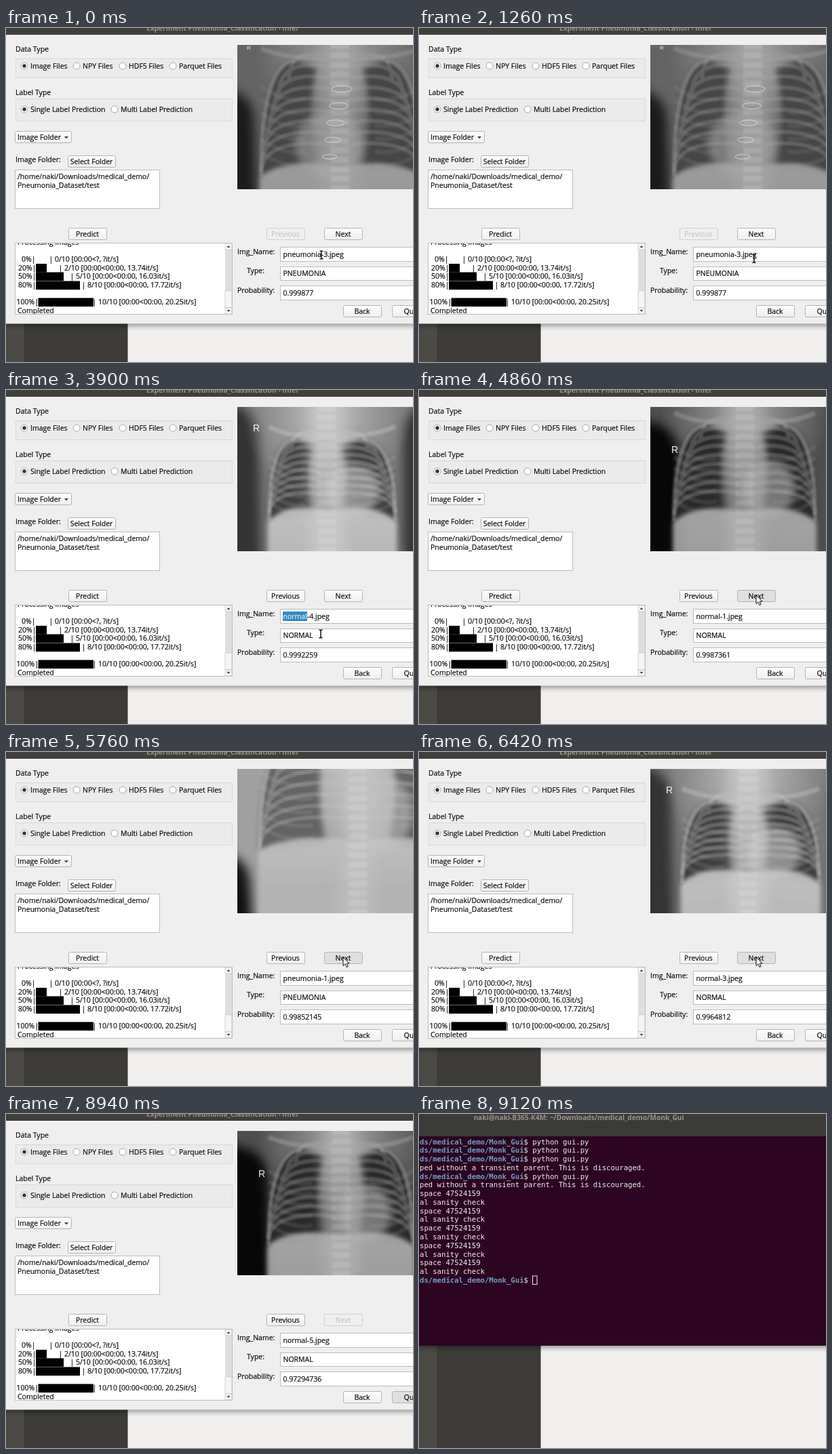
An HTML page with a canvas that plays this animation: 600 px wide and 493 px high, repeating every 9180 ms.

```html
<!DOCTYPE html>
<html lang="en">
<head>
<meta charset="utf-8">
<title>Classification demo</title>
<style>
html, body { margin: 0; width: 100%; height: 100%; overflow: hidden; background: #f0efee; }
svg, canvas, #dialog { position: absolute; left: 0; top: 0; }
#scan { left: 341px; top: 25px; }
text { font: 10.5px "Open Sans", "Noto Sans", sans-serif; fill: #0c0c0c; stroke: #0c0c0c; stroke-width: .2px; white-space: pre; }
.title { font-weight: bold; font-size: 10.2px; fill: #97938a; stroke: none; text-anchor: middle; }
.mono { font: 10.63px "DejaVu Sans Mono", monospace; fill: #eeeeec; stroke: none; }
.prompt { font-weight: bold; fill: #6f9fc0; }
.group { fill: #ebebeb; stroke: #d8d8d8; }
.field { fill: #fff; stroke: #bcbcbc; }
.button rect { fill: url(#face); stroke: #b4b4b4; }
.button text { text-anchor: middle; }
.button.hover rect { fill: #dfdfdf; }
.button.off rect { fill: #efefef; stroke: #cfcfcf; }
.button.off text { fill: #bdbdbd; stroke: none; }
#nameCopy { fill: #fff; stroke: none; }
.shadow { filter: drop-shadow(0 2px 4px #0007); }
</style>
</head>
<body>
<svg width="600" height="493">
  <rect width="600" height="493" fill="#f0efee"/>
  <rect width="179.5" height="493" fill="#3c3b37"/>
  <rect width="26.5" height="493" fill="#4b4a45"/>
  <rect class="shadow" x="-10" width="620" height="342" fill="#2d0422"/>
  <rect width="600" height="33" fill="#3c3b37"/>
  <text class="title" x="235.5" y="8.5">naki@naki-B365-K4M: ~/Downloads/medical_demo/Monk_Gui</text>
  <g id="terminal"></g>
  <rect x="167.5" y="239" width="6.5" height="12.5" fill="none" stroke="#eeeeec"/>
</svg>
<div id="dialog">
  <svg width="600" height="493">
    <defs>
      <linearGradient id="face" x2="0" y2="1"><stop stop-color="#fdfdfd"/><stop offset="1" stop-color="#efefef"/></linearGradient>
      <clipPath id="picked"><rect id="range" y="327" height="14"/></clipPath>
      <clipPath id="logView"><rect x="14" y="318" width="309" height="104"/></clipPath>
    </defs>
    <rect class="shadow" x="-10" width="620" height="436.5" fill="#efefef"/>
    <rect width="600" height="10" fill="#403f3b"/>
    <text class="title" x="319.5" y="3.5">Experiment Pneumonia_Classification - Infer</text>
    <rect class="group" x="14.5" y="45.5" width="319" height="28"/>
    <rect class="group" x="14.5" y="104.5" width="319" height="33"/>
    <text x="14" y="35">Data Type</text>
    <text x="14" y="99">Label Type</text>
    <text x="14" y="198">Image Folder:</text>
    <rect class="field" x="13.5" y="209.5" width="213" height="57"/>
    <text x="17" y="223">/home/naki/Downloads/medical_demo/</text>
    <text x="17" y="235.5">Pneumonia_Dataset/test</text>
    <rect class="field" x="13.5" y="317.5" width="320" height="105"/>
    <g id="log" clip-path="url(#logView)"></g>
    <rect x="323" y="318" width="10" height="104" fill="#dedede"/>
    <path d="M323 318h10v9h-10zM323 388h10v25h-10zM323 413h10v9h-10z" fill="#f5f5f5" stroke="#c4c4c4" stroke-width=".7"/>
    <path d="M325.5 324l2.5-3 2.5 3zM325.5 416l2.5 3 2.5-3z" fill="#444"/>
    <text x="341" y="333.5">Img_Name:</text>
    <text x="355" y="362">Type:</text>
    <text x="341" y="390.5">Probability:</text>
    <rect class="field" x="404.5" y="323.5" width="220" height="21"/>
    <rect class="field" x="404.5" y="352.5" width="220" height="20"/>
    <rect class="field" x="404.5" y="380.5" width="220" height="21"/>
    <text id="name" x="408.5" y="338"></text>
    <text id="type" x="408.5" y="366"></text>
    <text id="odds" x="408.5" y="394.5"></text>
    <g clip-path="url(#picked)">
      <rect x="405" y="327" width="60" height="14" fill="#308cc6"/>
      <text id="nameCopy" x="408.5" y="338"></text>
    </g>
    <g id="controls"></g>
    <path d="M86 160h6l-3 3.5z" fill="#444"/>
    <path id="arrow" d="M0 0v12.5l3-2.7 2 4.7 2.2-1-2-4.5h4z" fill="#fff" stroke="#111"/>
    <path id="beam" d="M-2.5-6q2.5 0 2.5 1.5q0-1.5 2.5-1.5M0-5v10M-2.5 6q2.5 0 2.5-1.5q0 1.5 2.5 1.5" fill="none" stroke="#111" stroke-width="1.5"/>
  </svg>
  <canvas id="scan" width="259" height="213"></canvas>
</div>
<script>
const LOOP = 9180, STEP = 60;
const $ = id => document.getElementById(id);
const label = (x, y, text, attrs = '') =>
  `<text x="${x}" y="${y}" ${attrs}>${text.replace(/</g, '&lt;')}</text>`;

// Window controls
const button = (id, x, y, w, h, text) => `<g class="button" id="${id}">
  <rect x="${x + .5}" y="${y + .5}" width="${w}" height="${h}" rx="2"/>${label(x + w / 2, y + 13, text)}</g>`;
const radio = (x, y, text, on) => `<circle cx="${x}" cy="${y}" r="5" fill="#fff" stroke="#a8a8a8"/>` +
  (on ? `<circle cx="${x}" cy="${y}" r="2.7" fill="#333"/>` : '') + label(x + 9, y + 4, text);

$('controls').innerHTML =
  radio(27, 56, 'Image Files', true) + radio(104, 56, 'NPY Files') +
  radio(172, 56, 'HDF5 Files') + radio(246, 56, 'Parquet Files') +
  radio(27, 120, 'Single Label Prediction', true) + radio(160, 120, 'Multi Label Prediction') +
  button('source', 13, 152, 83, 17, '') + label(17, 165, 'Image Folder') +
  button('select', 91, 188, 70, 17, 'Select Folder') + button('predict', 92, 295, 56, 17, 'Predict') +
  button('previous', 384, 295, 56, 17, 'Previous') + button('next', 469, 295, 56, 17, 'Next') +
  button('back', 497, 409, 56, 17, 'Back') + button('quit', 569, 409, 56, 17, 'Quit');

const logRow = (y, percent, x, bar, restX, rest) =>
  `<rect x="${x}" y="${y - 9.5}" width="${bar}" height="12.7"/>` +
  label(x + .5, y, percent + '%|', 'text-anchor="end"') + label(restX - 2.5, y, '| ' + rest);
$('log').innerHTML = label(17, 320, 'Processing Images') +
  logRow(345, 0, 43, 0, 66, '0/10 [00:00<?, ?it/s]') +
  logRow(357.5, 20, 44, 16, 80, '2/10 [00:00<00:00, 13.74it/s]') +
  logRow(370, 50, 44, 41, 97, '5/10 [00:00<00:00, 16.03it/s]') +
  logRow(383, 80, 44, 65, 114, '8/10 [00:00<00:00, 17.72it/s]') +
  logRow(408, 100, 47.5, 81.5, 130, '10/10 [00:00<00:00, 20.25it/s]') +
  label(17, 420.5, 'Completed');

// Terminal
const prompt = command => `<tspan class="prompt">ds/medical_demo/Monk_Gui</tspan>$ ${command}`;
const run = prompt('python gui.py');
const warning = 'ped without a transient parent. This is discouraged.';
const lines = [run, run, run, warning, run, warning];
for (let i = 0; i < 5; i++) lines.push('space 47524159', 'al sanity check');
lines.push(prompt(''));
$('terminal').innerHTML = lines.map((line, i) =>
  `<text class="mono" x="1" y="${44.5 + i * 12.77}">${line}</text>`).join('');

// Chest scans: positions on the stage, tones as grey levels
const wide = { spine: 492, edge: 366, arm: 90, left: 376, right: 612, top: 48, base: 203, gap: 34,
  heart: [-16, 172, 50, 48], bg: 28, body: 100, lung: 70, bright: 168, mark: [355, 32, 8], wires: [495, 90, 477, 190] };
const narrow = { spine: 463, edge: 350, arm: 150, left: 358, right: 575, top: 45, base: 165, gap: 28,
  heart: [0, 140, 45, 45], bg: 30, body: 105, lung: 78, bright: 180, mark: [353, 32, 8],
  wires: [463, 70, 453, 168], width: 245, bubble: true };
const clear = { spine: 473, edge: 372, arm: 20, left: 388, right: 574, rim: 586, top: 72, base: 177, gap: 20,
  heart: [38, 148, 40, 38], bg: 52, body: 120, lung: 62, bright: 205, mark: [364, 61, 14] };
const close = { spine: 518, edge: 360, arm: 150, left: 374, right: 660, top: -30, base: 130, gap: 46,
  heart: [30, 90, 50, 60], bg: 18, body: 160, lung: 100, bright: 196 };
const pale = { spine: 503, edge: 368, arm: 110, left: 382, right: 622, top: 52, base: 180, gap: 30,
  heart: [22, 155, 45, 42], bg: 18, body: 145, lung: 90, bright: 195, mark: [359, 34, 8] };
const sharp = { spine: 494, edge: 386, arm: 45, left: 387, right: 600, top: 52, base: 178, gap: 26,
  heart: [36, 146, 38, 42], bg: 8, body: 78, lung: 42, bright: 180, mark: [372, 93, 14] };

// Start time, file, probability, scan
const results = [
  [0, 'pneumonia-3', '0.999877', wide],
  [1680, 'pneumonia-4', '0.9999919', narrow],
  [2340, 'normal-4', '0.9992259', clear],
  [4800, 'normal-1', '0.9987361', { ...sharp, spine: 480, left: 376, right: 584 }],
  [5220, 'pneumonia-5', '0.99961376', { ...pale, spine: 490, right: 600, top: 60 }],
  [5760, 'pneumonia-1', '0.99852145', close],
  [6300, 'normal-3', '0.9964812', { ...clear, spine: 485, right: 590, rim: 610 }],
  [6780, 'normal-2', '0.9978934', { ...sharp, top: 66, base: 186 }],
  [7200, 'pneumonia-2', '0.99973446', pale],
  [7680, 'normal-5', '0.97294736', sharp],
];

const ctx = $('scan').getContext('2d');
const grey = (v, alpha = 1) => `rgba(${v},${v},${v},${alpha})`;
function pen(blur, color, width = 1) {
  ctx.filter = blur ? `blur(${blur}px)` : 'none';
  ctx.fillStyle = ctx.strokeStyle = color;
  ctx.lineWidth = width;
  ctx.beginPath();
}
function oval(x, y, rx, ry) {
  ctx.moveTo(x + rx, y);
  ctx.ellipse(x, y, rx, ry, 0, 0, 7);
}

function drawBody(s) {
  const rim = s.rim || 650;
  pen(8, grey(s.body));
  ctx.moveTo(310, s.arm);
  ctx.quadraticCurveTo(s.edge, s.arm, s.edge, s.arm + 50);
  ctx.lineTo(s.edge + 4, 260);
  ctx.lineTo(rim, 260);
  ctx.lineTo(rim, s.arm + 50);
  ctx.quadraticCurveTo(rim, s.arm, 640, s.arm);
  ctx.lineTo(640, 0);
  ctx.lineTo(310, 0);
  ctx.fill();

  const glow = ctx.createRadialGradient(s.spine, 35, 10, s.spine, 35, 125);
  glow.addColorStop(0, grey(s.bright, .8));
  glow.addColorStop(1, grey(s.bright, 0));
  pen(0, glow);
  ctx.fillRect(341, 25, 259, 213);
}

function drawSide(s, dir) {
  const inner = s.spine + dir * s.gap, outer = dir < 0 ? s.left : s.right;
  const span = outer - inner, height = s.base - s.top;
  const apex = inner + span * .4;
  const chestWall = () => {
    ctx.moveTo(apex, s.top);
    ctx.bezierCurveTo(inner + span * .85, s.top + 4, outer, s.top + height * .5, outer, s.base + 16);
  };

  pen(4, grey(s.lung));
  chestWall();
  ctx.lineTo(inner, s.base + 6);
  ctx.quadraticCurveTo(inner + span * .2, s.top + height * .5, inner, s.top + 12);
  ctx.fill();

  pen(1, grey(s.bright, .28), 6);
  for (let k = 0; k < 9; k++) {
    const u = k / 8, y = s.top - 6 + u * height * .85;
    const tip = inner + span * (.5 + .5 * Math.sqrt(u));
    ctx.moveTo(s.spine + dir * 8, y);
    ctx.bezierCurveTo(inner + span * .3, y - 10, tip, y, tip, y + height * .25);
  }
  ctx.stroke();

  pen(1.5, grey(s.bright, .14), 6);
  for (let k = 2; k < 8; k++) {
    const y = s.top + k * height / 8;
    ctx.moveTo(outer, y);
    ctx.quadraticCurveTo(inner + span * .6, y + 24, inner + span * .2, y + 18);
  }
  ctx.stroke();

  pen(1.5, grey(s.bright, .4), 6);
  chestWall();
  ctx.stroke();

  pen(1.5, grey(s.bright, .35), 7);
  ctx.moveTo(s.spine + dir * 12, s.top + 2);
  ctx.bezierCurveTo(inner, s.top - 8, apex, s.top + 2, outer, s.top - 18);
  ctx.stroke();
}

function drawAbdomen({ left, spine, right, base, bright }) {
  const fade = ctx.createLinearGradient(0, base, 0, base + 70);
  fade.addColorStop(0, grey(bright, .85));
  fade.addColorStop(1, grey(bright - 15, .9));
  pen(3, fade);
  ctx.moveTo(left - 2, 260);
  ctx.lineTo(left - 2, base + 18);
  ctx.bezierCurveTo(left + 20, base - 4, spine - 45, base - 8, spine, base + 2);
  ctx.bezierCurveTo(spine + 45, base - 8, right - 20, base - 4, right + 2, base + 18);
  ctx.lineTo(right + 2, 260);
  ctx.fill();
}

function drawScan(s) {
  ctx.setTransform(1, 0, 0, 1, -341, -25);
  ctx.clearRect(341, 25, 259, 213);
  ctx.save();
  ctx.beginPath();
  ctx.rect(341, 25, s.width || 259, 213);
  ctx.clip();
  pen(0, grey(s.bg));
  ctx.fillRect(341, 25, 259, 213);

  drawBody(s);
  drawSide(s, -1);
  drawSide(s, 1);
  drawAbdomen(s);

  const [dx, y, rx, ry] = s.heart;
  pen(6, grey(s.bright, .55));
  oval(s.spine + dx, y, rx, ry);
  ctx.fill();
  pen(10, grey(s.bright, .6));
  ctx.fillRect(s.spine - 26, 0, 52, 260);
  pen(1.5, grey(255, .13));
  for (let v = 22; v < 240; v += 14) ctx.fillRect(s.spine - 14, v, 28, 9);

  if (s.bubble) {
    pen(7, grey(70, .8));
    oval(540, 220, 26, 13);
    ctx.fill();
  }
  if (s.wires) {
    const [x0, y0, x1, y1] = s.wires;
    pen(0, grey(225, .8));
    for (let k = 0; k < 5; k++)
      oval(x0 + (x1 - x0) * k / 4, y0 + (y1 - y0) * k / 4, s.bubble ? 8 : 15 - k, 5 - k * .4);
    ctx.stroke();
  }
  if (s.mark) {
    const [x, y, size] = s.mark;
    pen(0, grey(240));
    ctx.font = `${size}px "Liberation Sans", sans-serif`;
    ctx.fillText('R', x, y);
  }
  ctx.restore();
}

// Pointer path: time, x, y
const path = [[0, 465, 335], [400, 470, 362], [720, 488, 378], [1020, 480, 374], [1500, 508, 307],
  [2460, 508, 307], [2880, 478, 335], [3060, 443, 333], [3360, 389, 331], [3720, 464, 360],
  [3900, 464, 360], [4140, 410, 365], [4260, 392, 360], [4620, 497, 303], [8340, 497, 303],
  [8640, 606, 405], [8880, 606, 405], [8940, 604, 416], [LOOP, 604, 416]];
function pointerAt(t) {
  const i = path.findIndex(p => p[0] > t);
  const [t0, x0, y0] = path[i - 1], [t1, x1, y1] = path[i];
  const u = (t - t0) / (t1 - t0);
  return [x0 + (x1 - x0) * u, y0 + (y1 - y0) * u];
}

let shown = -1;
function showResult(i) {
  if (i === shown) return;
  shown = i;
  const [, file, odds, scan] = results[i];
  $('name').textContent = $('nameCopy').textContent = file + '.jpeg';
  $('type').textContent = file.split('-')[0].toUpperCase();
  $('odds').textContent = odds;
  $('previous').classList.toggle('off', i === 0);
  $('next').classList.toggle('off', i === results.length - 1);
  drawScan(scan);
}

function render(now) {
  const t = Math.floor(now % LOOP / STEP) * STEP;
  showResult(results.findLastIndex(r => r[0] <= t));

  const [x, y] = pointerAt(t);
  const inField = x > 405 && [334, 362, 391].some(mid => Math.abs(y - mid) < 11);
  for (const [id, on] of [['beam', inField], ['arrow', !inField]]) {
    $(id).setAttribute('transform', `translate(${x} ${y})`);
    $(id).style.display = on ? '' : 'none';
  }
  $('next').classList.toggle('hover', shown < 9 && x > 469 && x < 525 && y > 295 && y < 312);
  $('quit').classList.toggle('hover', y > 409);

  const start = t < 3060 || t >= 4800 ? 444 : t < 3360 ? Math.max(408, x) : 408;
  $('range').setAttribute('x', start);
  $('range').setAttribute('width', 444 - start);
  $('dialog').style.opacity = t < 9060 ? 1 : t < 9120 ? .5 : 0;
  requestAnimationFrame(() => render(performance.now()));
}
render(0);
</script>
</body>
</html>
```
